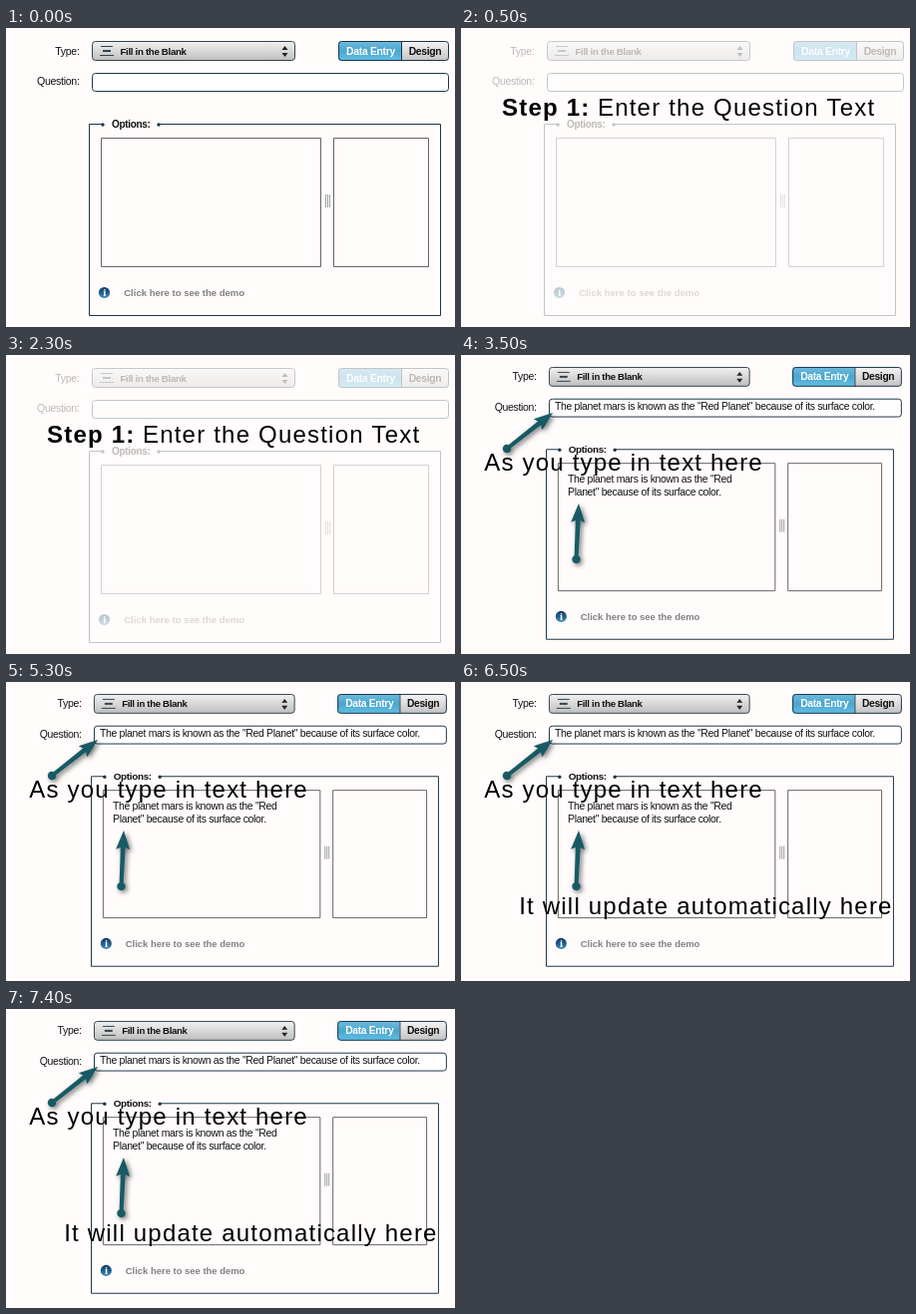
An HTML page with a canvas for the animation above (8 s loop, 450 by 300 pixels).

```html
<!DOCTYPE html>
<html lang="en">
<head>
<meta charset="utf-8">
<title>Fill in the blank demo</title>
<style>
html, body { margin: 0; width: 100%; height: 100%; overflow: hidden; background: #fffcfb; }
canvas { display: block; }
</style>
</head>
<body>
<canvas id="stage" width="450" height="300"></canvas>
<script>
const ctx = document.getElementById('stage').getContext('2d');
const LOOP = 8000;
const PAPER = '#fffcfb', NAVY = '#1d3549', GRAY = '#656565', TEAL = '#175a66';
const SANS = '"Liberation Sans", Arial, sans-serif';
const SERIF = '"Liberation Serif", serif';
const TIGHT = -0.32;

function text(str, x, y, size, { bold = false, color = '#111', align = 'left', spacing = TIGHT, family = SANS } = {}) {
  ctx.font = `${bold ? 'bold ' : ''}${size}px ${family}`;
  ctx.letterSpacing = `${spacing}px`;
  ctx.textAlign = align;
  ctx.fillStyle = color;
  ctx.fillText(str, x, y);
}

function caption(str, x, y, bold) {
  text(str, x, y, 24, { bold, color: '#000', spacing: 1.2 });
}

function gradient(y0, y1, ...colors) {
  const g = ctx.createLinearGradient(0, y0, 0, y1);
  colors.forEach((c, i) => g.addColorStop(i / (colors.length - 1), c));
  return g;
}

function box(x0, y0, x1, y1, stroke, fill, radius = 0) {
  ctx.beginPath();
  ctx.roundRect(x0 + 0.5, y0 + 0.5, x1 - x0 - 1, y1 - y0 - 1, radius);
  if (fill) { ctx.fillStyle = fill; ctx.fill(); }
  ctx.strokeStyle = stroke;
  ctx.lineWidth = 1;
  ctx.stroke();
}

function dot(x, y, r, color) {
  ctx.beginPath();
  ctx.arc(x, y, r, 0, Math.PI * 2);
  ctx.fillStyle = color;
  ctx.fill();
}

function triangle(x, y, h) {
  ctx.beginPath();
  ctx.moveTo(x - 3, y);
  ctx.lineTo(x + 3, y);
  ctx.lineTo(x, y + h);
  ctx.fill();
}

function drawType() {
  box(86, 13, 290, 33, '#34424e', gradient(13, 33, '#f2f2f2', '#d8d8d8', '#bdbdbd'), 3);
  ctx.fillStyle = '#34414c';
  ctx.fillRect(95, 18, 12, 1);
  ctx.fillRect(97, 22, 8, 2);
  ctx.fillRect(94, 27, 14, 1);
  ctx.fillStyle = '#222';
  triangle(279.5, 22, -4);
  triangle(279.5, 25, 4);
  text('Fill in the Blank', 114.5, 26.5, 9.7, { bold: true });
}

function drawTabs() {
  ctx.save();
  ctx.beginPath();
  ctx.roundRect(333, 13, 111, 20, 3);
  ctx.clip();
  ctx.fillStyle = gradient(13, 33, '#6fbcdc', '#4aa5cf', '#62c0e4');
  ctx.fillRect(333, 13, 63, 20);
  ctx.fillStyle = gradient(13, 33, '#f4f4f4', '#dcdcdc', '#c2c2c2');
  ctx.fillRect(396, 13, 48, 20);
  ctx.restore();
  ctx.fillStyle = NAVY;
  ctx.fillRect(396, 13, 1, 20);
  box(333, 13, 444, 33, NAVY, null, 3);
  text('Data Entry', 365.5, 26.5, 10.4, { bold: true, color: '#fff', align: 'center' });
  text('Design', 420, 26.5, 10.4, { bold: true, align: 'center' });
}

function drawPanel() {
  box(83, 96, 436, 289, NAVY);
  ctx.fillStyle = PAPER;
  ctx.fillRect(98, 95, 55, 3);
  dot(97, 97, 1.7, NAVY);
  dot(153, 97, 1.7, NAVY);
  text('Options:', 106, 99.5, 10, { bold: true });
  box(95, 110, 316, 240, GRAY);
  box(328, 110, 424, 240, GRAY);
  ctx.fillStyle = '#a0a0a0';
  for (let x = 320; x <= 324; x += 2) ctx.fillRect(x, 167, 1, 13);

  dot(98.5, 265.5, 5.6, gradient(260, 271, '#153b60', '#1f5c8c', '#4190ba'));
  text('i', 98.5, 269, 11, { bold: true, color: '#fff', align: 'center', family: SERIF });
  text('Click here to see the demo', 118.2, 268.7, 9.55, { bold: true, color: '#808080', spacing: 0 });
}

function drawForm() {
  text('Type:', 73.5, 26.5, 10.6, { align: 'right' });
  text('Question:', 73.5, 57, 10.6, { align: 'right' });
  drawType();
  drawTabs();
  box(86, 45, 444, 64, NAVY, '#fff', 3);
  drawPanel();
}

// The second half shows the same form slightly reduced.
function drawReducedForm() {
  ctx.save();
  ctx.transform(0.9885, 0, 0, 0.992, 2.96, -0.95);
  drawForm();
  ctx.restore();
}

function arrow(x0, y0, x1, y1) {
  const length = Math.hypot(x1 - x0, y1 - y0);
  const neck = length - 19;
  ctx.save();
  ctx.shadowColor = 'rgba(0,0,0,.55)';
  ctx.shadowBlur = 5;
  ctx.shadowOffsetX = 2;
  ctx.shadowOffsetY = 2;
  ctx.translate(x0, y0);
  ctx.rotate(Math.atan2(y1 - y0, x1 - x0));
  ctx.beginPath();
  ctx.arc(0, 0, 4.2, 0.5, Math.PI * 2 - 0.5);
  ctx.lineTo(neck + 2, -2.4);
  ctx.lineTo(neck, -7);
  ctx.lineTo(length, 0);
  ctx.lineTo(neck, 7);
  ctx.lineTo(neck + 2, 2.4);
  ctx.closePath();
  ctx.fillStyle = TEAL;
  ctx.fill();
  ctx.restore();
}

function drawTyped() {
  const start = 'The planet mars is known as the "Red';
  const end = 'Planet" because of its surface color.';
  text(`${start} ${end}`, 94, 55, 10.45);
  text(start, 107, 128, 10.45);
  text(end, 107, 141.3, 10.45);
  arrow(46, 94, 92, 58);
  arrow(115.5, 205, 118, 149);
  caption('As you type in text here', 23.3, 116);
}

function fadeForm() {
  ctx.globalAlpha = 0.72;
  ctx.fillStyle = PAPER;
  ctx.fillRect(0, 0, 450, 300);
  ctx.globalAlpha = 1;
}

function render(t) {
  ctx.fillStyle = PAPER;
  ctx.fillRect(0, 0, 450, 300);
  if (t < 3500) {
    drawForm();
    if (t >= 500) {
      fadeForm();
      caption('Step 1:', 41, 88, true);
      caption('Enter the Question Text', 137, 88);
    }
  } else {
    drawReducedForm();
    drawTyped();
    if (t >= 6500) caption('It will update automatically here', 58.2, 233);
  }
}

const begin = performance.now();
function tick() {
  render((performance.now() - begin) % LOOP);
  requestAnimationFrame(tick);
}
tick();
</script>
</body>
</html>
```
